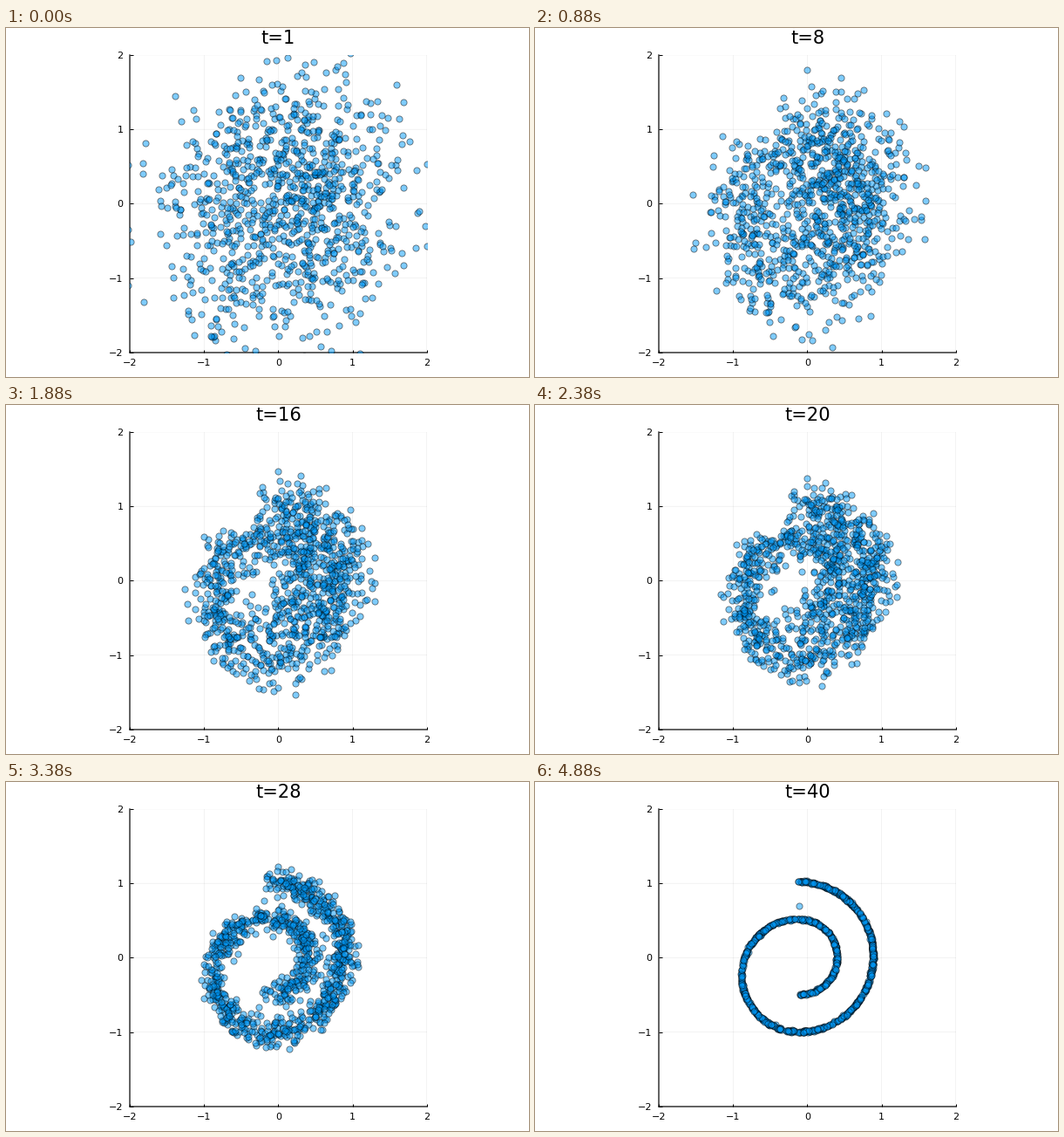
A matplotlib script for the animation above (6.26 s loop, 600 by 400 pixels).

```python
import numpy as np
import matplotlib.pyplot as plt
from matplotlib.animation import FuncAnimation

WIDTH, HEIGHT, DPI = 600, 400, 100
LOOP_MS, FRAME_MS, STEP_MS = 6260, 20, 125
LAST_STEP = 40
COUNT = 1000
PX = 72 / DPI  # points per pixel

plt.rcParams["font.family"] = "DejaVu Sans"


def arc(cx, cy, radius, start):
    """Half circle, counter-clockwise from the start angle."""
    angle = start + np.linspace(0, np.pi, int(600 * radius))
    return np.column_stack([cx + radius * np.cos(angle),
                            cy + radius * np.sin(angle)])


spiral = np.vstack([
    arc(-0.105, 0.01, 0.505, -np.pi / 2),
    arc(-0.13, -0.235, 0.755, np.pi / 2),
    arc(-0.123, 0.015, 1.01, -np.pi / 2),
])

rng = np.random.default_rng(12)
goal = rng.choice(spiral, COUNT)
noise = rng.normal(0, 1, (COUNT, 2))

# One straggler settles between the arms.
goal[0], noise[0] = (-0.105, 0.69), (-0.9, 0.8)


def particles(step):
    """Noise around the spiral: fades quickly at first, then linearly."""
    left = (LAST_STEP - step) / (LAST_STEP - 1)
    return goal + noise * (0.007 + 0.27 * left + 0.3 * left ** 5)


fig = plt.figure(figsize=(WIDTH / DPI, HEIGHT / DPI), dpi=DPI, facecolor="white")
ax = fig.add_axes([142 / WIDTH, 1 - 372 / HEIGHT,
                   340.8 / WIDTH, 341.1 / HEIGHT])
ax.set(xlim=(-2, 2), ylim=(-2, 2), xticks=range(-2, 3), yticks=range(-2, 3))
ax.set_axisbelow(True)
ax.grid(color="black", alpha=0.1, linewidth=0.5 * PX, snap=False)
ax.spines[["top", "right"]].set_visible(False)
ax.spines[["left", "bottom"]].set(linewidth=1.2 * PX, zorder=1, snap=False)
ax.tick_params(direction="in", length=3.5 * PX, width=PX, labelsize=11.1 * PX)
ax.tick_params(axis="x", pad=7.3 * PX)
ax.tick_params(axis="y", pad=7.5 * PX)

title = fig.text(312.5 / WIDTH, 1 - 18 / HEIGHT, "", fontsize=21 * PX,
                 ha="center", va="baseline")
dots, = ax.plot([], [], "o", markersize=7.2 * PX, markerfacecolor="#009afa",
                markeredgecolor="black", markeredgewidth=0.9 * PX, alpha=0.5)


def update(frame):
    elapsed = frame * FRAME_MS + FRAME_MS / 2
    step = min(LAST_STEP, 1 + int(elapsed // STEP_MS))
    dots.set_data(*particles(step).T)
    title.set_text(f"t={step}")
    return dots, title


anim = FuncAnimation(fig, update, frames=LOOP_MS // FRAME_MS,
                     interval=FRAME_MS, repeat=True, repeat_delay=0)
plt.show()
```
